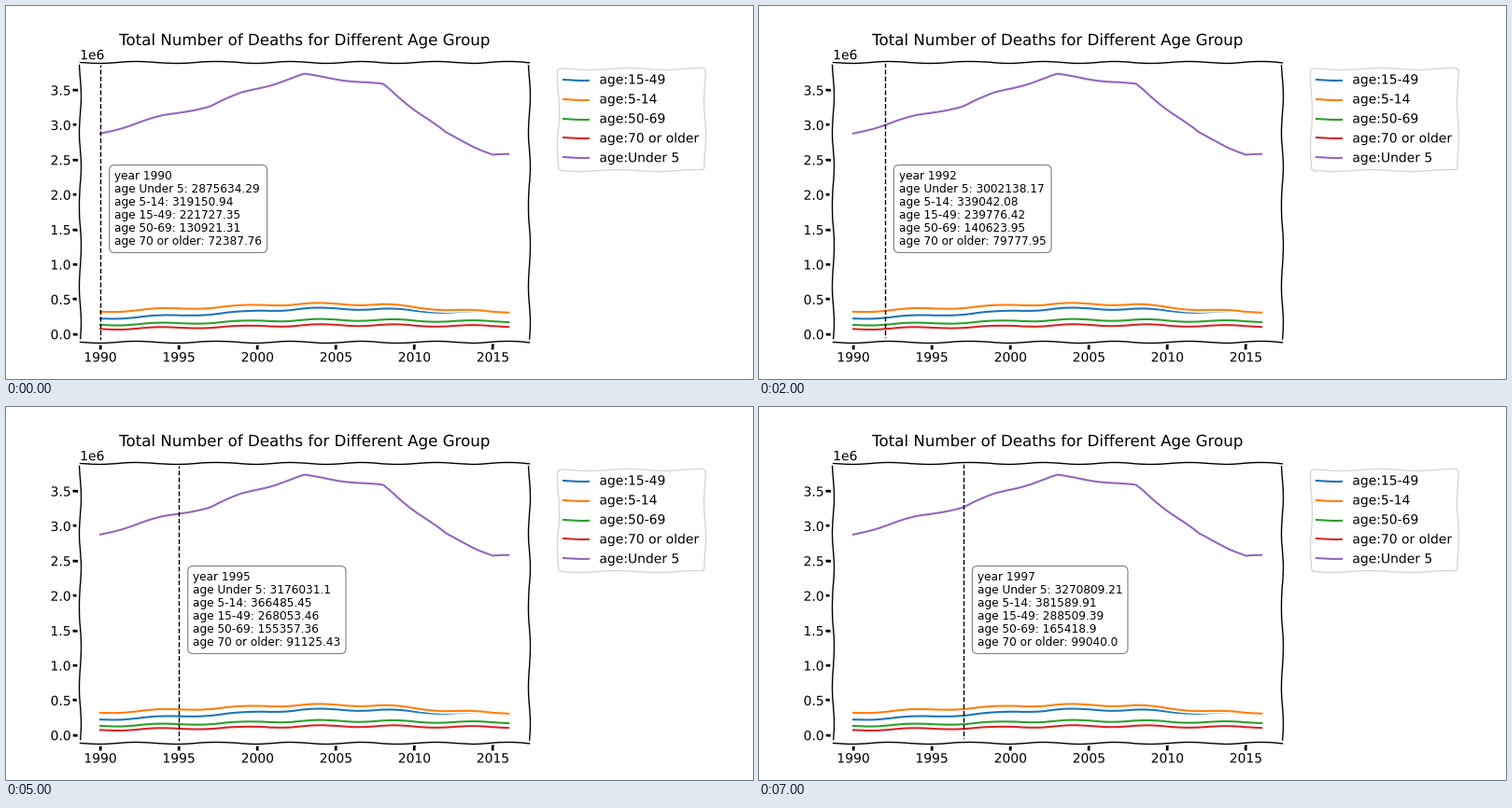
Animation, 800 px wide and 400 px high, one loop 8000 ms. Source, as a matplotlib script:

```python
import numpy as np
import matplotlib.pyplot as plt
from matplotlib import patheffects
from matplotlib.animation import FuncAnimation

START, STEPS = 1990, 8
YEARS = np.arange(START, 2017)

# Turning points of each curve; straight between them, level after the last
TURNS = [1990, 1994, 1997, 1999, 2003, 2008, 2012, 2015]
LEVELS = {
    "15-49": [221727.35, 257825.49, 288509.39, 313e3, 366e3, 358e3, 315e3, 304e3],
    "5-14": [319150.94, 358933.22, 381589.91, 401e3, 435e3, 423e3, 350e3, 318e3],
    "50-69": [130921.31, 150326.59, 165418.9, 178e3, 203e3, 201e3, 186e3, 181e3],
    "70 or older": [72387.76, 87168.14, 99040.0, 105e3, 127e3, 128e3, 118e3, 113e3],
    "Under 5": [2875634.29, 3128642.05, 3270809.21, 3455e3, 3720e3, 3575e3, 2882e3, 2568e3],
}
BOX_ORDER = ["Under 5", "5-14", "15-49", "50-69", "70 or older"]

SKETCH = {
    "path.sketch": (1, 89, 2),
    "path.effects": [patheffects.withStroke(linewidth=4, foreground="w")],
    "axes.linewidth": 1,
    "xtick.major.width": 2,
    "ytick.major.width": 2,
    "xtick.major.size": 6,
    "ytick.major.size": 6,
    "xtick.major.pad": 1.5,
    "ytick.major.pad": 1,
}


def deaths(group, year):
    return np.interp(year, TURNS, LEVELS[group])


def info(year):
    rows = [f"age {group}: {round(float(deaths(group, year)), 2)}"
            for group in BOX_ORDER]
    return "\n".join([f"year {year}", *rows])


plt.rcParams["font.family"] = "DejaVu Sans"

# Hand-drawn look for the chart only; the marker and box stay straight
with plt.rc_context(SKETCH):
    fig = plt.figure(figsize=(8, 4), dpi=100, facecolor="white")
    ax = fig.add_axes([0.099, 0.1, 0.601, 0.75])
    for group in LEVELS:
        ax.plot(YEARS, deaths(group, YEARS), lw=1.5, label=f"age:{group}")
    ax.set_xticks(range(1990, 2016, 5))
    ticks = np.arange(0, 4, 0.5)
    ax.set_yticks(ticks * 1e6, labels=[f"{t:.1f}" for t in ticks])
    ax.set_xlim(1988.7, 2017.3)
    ax.set_ylim(-0.11e6, 3.902e6)
    ax.legend(loc="upper left", bbox_to_anchor=(1.05, 1))
    fig.text(0.399, 0.895, "Total Number of Deaths for Different Age Group",
             size=12, ha="center")
    fig.text(0.099, 0.857, "1e6", size=10)

marker = ax.axvline(START, color="black", ls="--", lw=1)
box = ax.text(START, 0.475, "", size=8.75, va="center", linespacing=1.1,
              transform=ax.get_xaxis_transform(),
              bbox=dict(boxstyle="round,pad=0.45", fc="white", ec="black",
                        lw=0.8, alpha=0.5))


def update(step):
    year = START + step
    marker.set_xdata([year, year])
    box.set_x(year + 0.9)
    box.set_text(info(year))
    return marker, box


anim = FuncAnimation(fig, update, frames=STEPS, interval=1000,
                     repeat=True, repeat_delay=0, blit=False)
plt.show()
```
